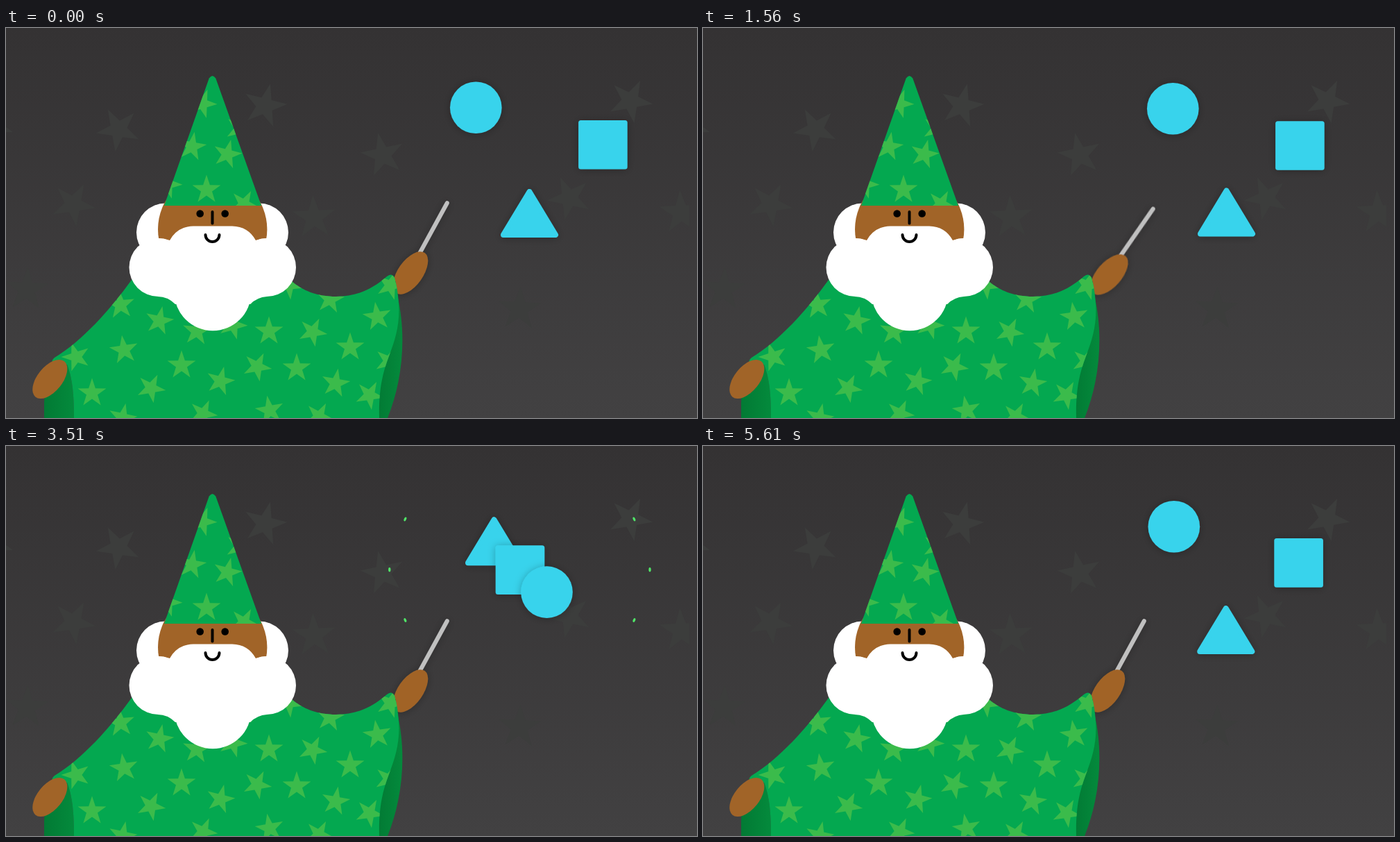
These frames come from a looping animation (996 px wide and 562 px high, 5640 ms). An HTML page:

```html
<!DOCTYPE html>
<html lang="en">
<head>
<meta charset="utf-8">
<title>Wizard and shapes</title>
<style>
  html, body { margin: 0; width: 100%; height: 100%; overflow: hidden; background: #393738; }
  svg { display: block; width: 100vw; height: 100vh; }
</style>
</head>
<body>
<svg viewBox="0 0 996 562">
  <defs>
    <linearGradient id="night" x1="0" y1="0" x2="0" y2="1">
      <stop offset="0" stop-color="#343233"/>
      <stop offset="1" stop-color="#424142"/>
    </linearGradient>
    <linearGradient id="sleeve" x1="0" y1="0" x2="1" y2="0">
      <stop offset="0" stop-color="#027a34"/>
      <stop offset="1" stop-color="#048a3c"/>
    </linearGradient>
    <filter id="shadow" x="-50%" y="-50%" width="200%" height="200%">
      <feDropShadow dx="0" dy="1" stdDeviation="6" flood-color="#000" flood-opacity=".27"/>
    </filter>
    <path id="robe" d="M190 350L181 363C150 406 110 451 70 475Q64 480 68 486L88 485
      C96 505 98 530 98 562H538C537 520 543 497 552 473C562 447 568 425 566 397
      C565 382 563 370 560 360Q556 352 549 358C527 377 505 387 476 387C448 387 427 378 412 365L400 350Z"/>
    <path id="hat" d="M228 256L292.7 72.5Q297.5 65.5 302.3 72.5L368 256Z"/>
    <clipPath id="robeClip"><use href="#robe"/></clipPath>
    <clipPath id="hatClip"><use href="#hat"/></clipPath>
    <clipPath id="skyClip"><rect width="985" height="562"/></clipPath>
  </defs>

  <rect width="996" height="562" fill="url(#night)"/>
  <g id="skyStars" fill="#3c3d3c" clip-path="url(#skyClip)"/>

  <path d="M85 484Q55 505 55 540V562H98C98 530 96 505 88 485Z" fill="url(#sleeve)"/>
  <path d="M564 385C577 440 573 505 550 562H536V500Z" fill="url(#sleeve)"/>

  <g id="arm" filter="url(#shadow)">
    <path d="M596 325L635.8 252.2" stroke="#c0c0c0" stroke-width="6" stroke-linecap="round"/>
    <ellipse rx="35.5" ry="18" transform="translate(583 353) rotate(-54.7)" fill="#a16428"/>
  </g>

  <use href="#robe" fill="#04a850"/>
  <g id="robeStars" fill="#3bbb4b" clip-path="url(#robeClip)"/>
  <ellipse rx="33" ry="18" transform="translate(63.3 506) rotate(-51)" fill="#a16428"/>

  <g fill="#fff">
    <circle cx="230" cy="294.5" r="42"/>
    <circle cx="365" cy="294.5" r="42"/>
  </g>
  <ellipse cx="297.7" cy="290" rx="78.7" ry="80" fill="#a16428"/>
  <g fill="#fff">
    <circle cx="219.5" cy="345" r="42"/>
    <circle cx="376" cy="345" r="42"/>
    <circle cx="298" cy="381" r="55.3"/>
    <path d="M219 303Q228 303 236 306Q247 286 270 285.5H326Q349 286 360 306Q368 303 376 303
      V387Q362 388 352 398H244Q233 387 219 387Z"/>
  </g>
  <use href="#hat" fill="#04a850"/>
  <g id="hatStars" fill="#3bbb4b" clip-path="url(#hatClip)"/>

  <circle cx="279.7" cy="267.5" r="5.3"/>
  <circle cx="315.7" cy="267.5" r="5.3"/>
  <path d="M297.5 265V281.5M287.5 298a10 10 0 0 0 20 0" fill="none" stroke="#000"
    stroke-width="4" stroke-linecap="round"/>

  <g id="sparks" fill="#50e668"/>
  <g fill="#39d3ec" stroke="#39d3ec" stroke-width="0">
    <path id="triangle" d="M0 4L37.5 66H-37.5Z" stroke-width="8" stroke-linejoin="round" filter="url(#shadow)"/>
    <rect id="square" x="-35.3" y="-35.3" width="70.6" height="70.6" rx="3.5" filter="url(#shadow)"/>
    <circle id="circle" r="37.3" filter="url(#shadow)"/>
  </g>
</svg>
<script>
const LOOP = 5640, STEP = 30, BOB = 1400, DEPTH = 12;
const $ = id => document.getElementById(id);

function add(parent, tag, attrs) {
  const node = document.createElementNS('http://www.w3.org/2000/svg', tag);
  for (const name in attrs) node.setAttribute(name, attrs[name]);
  parent.appendChild(node);
  return node;
}

function starPath(cx, cy, radius, turn) {
  const points = Array.from({ length: 10 }, (_, i) => {
    const a = (turn + i * 36) * Math.PI / 180, r = i % 2 ? radius * 0.39 : radius;
    return (cx + r * Math.sin(a)).toFixed(1) + ' ' + (cy - r * Math.cos(a)).toFixed(1);
  });
  return 'M' + points.join('L') + 'Z';
}

// Each star is x, y, rotation.
function addStars(id, radius, stars) {
  add($(id), 'path', { d: stars.map(([x, y, turn]) => starPath(x, y, radius, turn)).join('') });
}

addStars('skyStars', 32.5, [
  [162, 146, 44], [373, 112, 14], [543, 183, -12], [97, 254, 28], [444, 273, -3],
  [30, 377, 3], [740, 405, 3], [812, 245, -24], [973, 266, -3], [900, 105, 26], [-21, 140, 36]
]);
addStars('robeStars', 21.5, [
  [165, 399, -5], [221, 422, 12], [379, 437, 0], [275, 437, 5], [327, 428, 20],
  [442, 438, 26], [467, 391, 8], [408, 370, 30], [535, 416, -8], [496, 460, 0],
  [170, 464, -8], [101, 474, -18], [253, 486, 0], [309, 509, 14], [362, 488, 26],
  [419, 490, 0], [475, 512, 10], [524, 529, 28], [124, 526, 0], [209, 519, 26],
  [168, 562, 12], [284, 556, 24], [380, 551, -10], [451, 560, 28], [552, 480, 22],
  [554, 371, 20], [335, 390, 40]
]);
addStars('hatStars', 21.5, [
  [283, 109, 20], [337, 145, 22], [268, 171, 10], [319, 182, 14], [289, 233, 0],
  [233, 225, 20], [343, 254, 28]
]);

// away: resting place, meet: height on arrival, near: settled place, bob: sign of the inward drift
const shapes = [
  { node: $('circle'), away: [677.3, 114.8], meet: 195.5, near: [779.5, 210.6], bob: 1, drift: 0 },
  { node: $('square'), away: [860.4, 168.2], meet: 173.5, near: [741, 178.6], bob: 0, drift: -1.5 },
  { node: $('triangle'), away: [754.5, 232], meet: 116.2, near: [703.5, 102.3], bob: -1, drift: 0 }
];

const sparks = [0, 23.8, 156.2, 180, 203.8, 336.2].map(turn => ({
  reach: turn % 180 ? 182 : 189.3,
  node: add($('sparks'), 'rect', { y: -3.1, height: 6.2, ry: 3.1, transform: `translate(740.4 178.2) rotate(${turn})` })
}));

const mix = (a, b, k) => a + (b - a) * k;
const progress = (t, from, to) => Math.min(1, Math.max(0, (t - from) / (to - from)));
const ease = (t, from, to) => {
  const u = progress(t, from, to);
  return u * u * (3 - 2 * u);
};
const easeOut = (t, from, to) => 1 - (1 - progress(t, from, to)) ** 3;
const bob = t => DEPTH * (1 - Math.cos(2 * Math.PI * t / BOB)) / 2;

function drawShapes(t) {
  const gather = ease(t, 2146, 2999), settle = ease(t, 2850, 3500), spread = ease(t, 4880, 5667);
  const floatAway = bob(Math.min(t, 2100));
  const floatNear = t > 3500 && t < 4900 ? bob(t - 3500) : 0;
  const sway = -3.5 * Math.sin(Math.PI * Math.min(t, 2100) / BOB);
  for (const { node, away, meet, near, bob: sign, drift } of shapes) {
    const start = away[1] + (sign ? sign * floatAway : sway);
    const nearY = mix(start, meet, gather) + (near[1] - meet) * settle
      - sign * floatNear + drift * ease(t, 3500, 4900);
    const x = mix(mix(away[0], near[0], gather), away[0], spread);
    const y = mix(nearY, away[1], spread);
    node.setAttribute('transform', `translate(${x.toFixed(2)} ${y.toFixed(2)})`);
  }
}

function drawSparks(t) {
  const head = easeOut(t, 2950, 3400), tail = easeOut(t, 3030, 3630);
  const visible = t > 2950 && t < 3570;
  for (const { node, reach } of sparks) {
    const from = mix(60, reach, tail * 1.0), to = mix(60, reach, head);
    const length = Math.max(0, to - from) + (t >= 3450 && visible ? 3.5 * (1 - progress(t, 3480, 3570)) : 0);
    node.setAttribute('x', to - length);
    node.setAttribute('width', visible ? length : 0);
    node.setAttribute('rx', Math.min(3.1, length / 2));
  }
}

function draw(t) {
  const swing = 40 * (ease(t, 1474, 1824) - ease(t, 1824, 2125));
  $('arm').setAttribute('transform', `rotate(${swing.toFixed(2)} 562 378)`);
  drawShapes(t);
  drawSparks(t);
}

const begin = performance.now();
function tick() {
  const t = (performance.now() - begin) % LOOP;
  draw(Math.floor(t / STEP) * STEP);
  requestAnimationFrame(tick);
}
tick();
</script>
</body>
</html>
```
